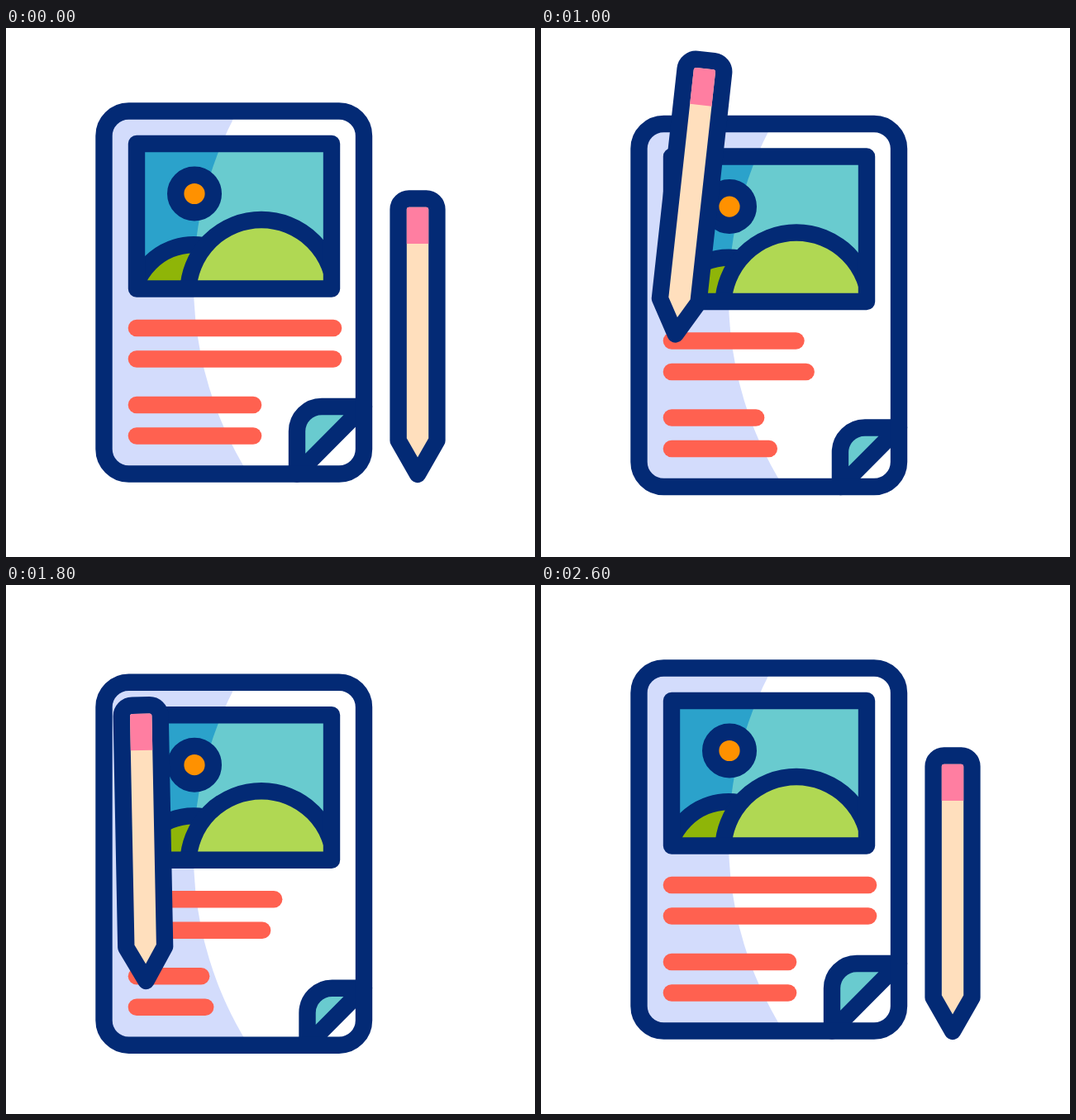
Animation, 640 px wide and 640 px high, one loop 3000 ms. Source, as an HTML page:

```html
<!DOCTYPE html>
<html lang="en">
<head>
<meta charset="utf-8">
<title>Article and pencil</title>
<style>
  html, body { margin: 0; width: 100%; height: 100%; overflow: hidden; background: #fff; }
  svg { display: block; width: 100vw; height: 100vh; }
  .ink { stroke: #032a75; stroke-width: 20.4; stroke-linecap: round; stroke-linejoin: round; }
  .none { fill: none; }
  #lines, #sparks { fill: none; stroke-width: 20.6; stroke-linecap: round; }
  #lines { stroke: #ff6150; }
  #sparks { stroke: #ffcb4f; stroke-width: 20; }
</style>
</head>
<body>
<svg viewBox="0 0 640 640">
  <defs>
    <clipPath id="sheet"><rect x="118.5" y="100.5" width="314.5" height="439" rx="30"/></clipPath>
    <clipPath id="photo"><rect x="158" y="140" width="236" height="175.5"/></clipPath>
  </defs>

  <g id="page">
    <g clip-path="url(#sheet)">
      <rect x="108" y="90" width="336" height="460" fill="#d3dcfc"/>
      <circle cx="662" cy="308.6" r="435" fill="#fff"/>
    </g>
    <g clip-path="url(#photo)">
      <rect x="148" y="130" width="256" height="196" fill="#2ba2cb"/>
      <circle cx="662" cy="308.6" r="435" fill="#69cbcf"/>
      <circle class="ink" cx="227" cy="336.4" r="74.2" fill="#8fb508"/>
      <circle class="ink" cx="309" cy="320.6" r="88.6" fill="#b0d853"/>
      <circle class="ink" cx="228" cy="200.5" r="22.8" fill="#ff9100"/>
    </g>
    <rect class="ink none" x="158" y="140" width="236" height="175.5"/>
    <g id="lines"></g>
    <path id="fold" class="ink" fill="#69cbcf"/>
    <rect class="ink none" x="118.5" y="100.5" width="314.5" height="439" rx="30"/>
  </g>

  <g id="sparks"></g>

  <!-- the origin is the point of the pencil -->
  <g id="pencil">
    <path class="ink" fill="#ffdfbd" d="M-23.4-41V-320.5a13 13 0 0 1 13-13H10.4a13 13 0 0 1 13 13V-41L0 0Z"/>
    <path fill="#ff7ea1" d="M-13.2-279V-320.3a3 3 0 0 1 3-3H10.2a3 3 0 0 1 3 3V-279Z"/>
  </g>
</svg>

<script>
const LOOP = 3000, STEP = 40;
const $ = id => document.getElementById(id);

const addPath = parent =>
  parent.appendChild(document.createElementNS('http://www.w3.org/2000/svg', 'path'));

// Smooth pulse 0 -> 1 -> 0 over u = 0..1
const pulse = u => u <= 0 || u >= 1 ? 0 : Math.sin(Math.PI * u) ** 2;

// The same pulse played twice in a row
const twice = (t, start, period) => pulse((t - start) / period) + pulse((t - start) / period - 1);

// Pencil point: time, x, y, tilt
const KEYS = [
  [200, 498, 540, 0],
  [520, 184.7, 386.3, 9.1],
  [760, 158, 359.5, 8],
  [1000, 162.7, 370.5, 6.3],
  [1110, 158, 500, -2],
  [1500, 238, 380.5, 5.8],
  [1560, 233, 381.5, 5.6],
  [1890, 158, 500, -2.5],
  [2000, 161.3, 485.5, -2.2],
  [2280, 450.6, 538.5, -0.3],
  [2480, 498, 540, 0]
];

const slope = (i, c) => (KEYS[i + 1][c] - KEYS[i][c]) / (KEYS[i + 1][0] - KEYS[i][0]);

// Tangent that never overshoots a key
function tangent(i, c) {
  if (i === 0 || i === KEYS.length - 1) return 0;
  const a = slope(i - 1, c), b = slope(i, c);
  return a * b <= 0 ? 0 : 2 * a * b / (a + b);
}

function track(t, c) {
  const last = KEYS.length - 1;
  if (t <= KEYS[0][0]) return KEYS[0][c];
  if (t >= KEYS[last][0]) return KEYS[last][c];
  const i = KEYS.findIndex(k => k[0] > t) - 1;
  const [p, q] = [KEYS[i], KEYS[i + 1]];
  const d = q[0] - p[0], u = (t - p[0]) / d, v = 1 - u;
  return p[c] * v * v * (1 + 2 * u) + q[c] * u * u * (3 - 2 * u)
    + d * u * v * (v * tangent(i, c) - u * tangent(i + 1, c));
}

// Text lines: y, right end, shrink
const lines = [
  [363, 396, 90],
  [400.5, 396, 90],
  [456, 299, 63],
  [493.5, 299, 63]
].map(([y, end, shrink], i) => ({ y, end, shrink, start: 448 - 80 * i, el: addPath($('lines')) }));

// Sparks: inner end and direction
const sparks = [
  [87, 457, -15, -17],
  [79, 480, -24, -4],
  [87, 506, -22, 13]
].map(([x, y, dx, dy]) => ({ x, y, dx, dy, el: addPath($('sparks')) }));

const HITS = [1105, 1895], HALF = 240;
const SPARK_LIFE = 300, SPARK_REACH = 1.22;

function drawSparks(t) {
  const age = HITS.map(h => t - h + 15).find(a => a > 0 && a < SPARK_LIFE);
  $('sparks').style.display = age === undefined ? 'none' : '';
  if (age === undefined) return;
  const head = SPARK_REACH * Math.min(1, age / 146);
  const tail = SPARK_REACH * Math.max(0, (age - 154) / 146);
  for (const { x, y, dx, dy, el } of sparks) {
    const at = k => `${x + dx * k} ${y + dy * k}`;
    el.setAttribute('d', `M${at(tail)}L${at(head)}`);
  }
}

function draw(t) {
  const drop = 26 * HITS.reduce((sum, h) => sum + pulse((t - h + HALF) / (2 * HALF)), 0);
  $('page').setAttribute('transform', `translate(0 ${drop})`);

  for (const { y, end, shrink, start, el } of lines) {
    el.setAttribute('d', `M158 ${y}H${end - shrink * twice(t, start - 0, 1000)}`);
  }

  const d = 14.5 * twice(t, 200, 1160);
  $('fold').setAttribute('d', `M433 ${458 + d}H${382 + d}a30 30 0 0 0-30 30V539.5Z`);

  drawSparks(t);
  $('pencil').setAttribute('transform',
    `translate(${track(t, 1)} ${track(t, 2)}) rotate(${track(t, 3)})`);
}

function frame() {
  const t = performance.now() % LOOP;
  draw(Math.floor(t / STEP) * STEP);
  requestAnimationFrame(frame);
}
frame();
</script>
</body>
</html>
```
